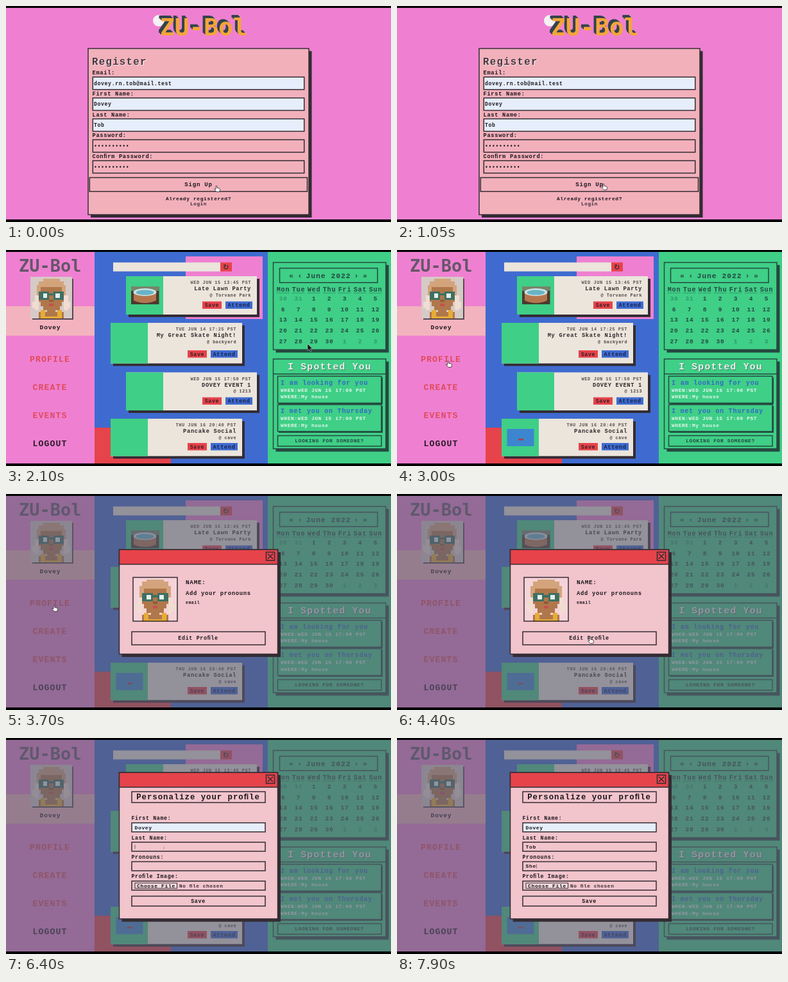
Recreate the animation shown at these times as an HTML page. Size 600 by 338 pixels, loop 8 s.

```html
<!DOCTYPE html>
<html lang="en">
<head>
<meta charset="utf-8">
<title>Register and edit profile</title>
<style>
  html, body { margin: 0; width: 100%; height: 100%; overflow: hidden; background: #000; }
  svg { display: block; width: 100%; height: 100%; }
  text { font-family: "Liberation Mono", monospace; font-weight: 700; letter-spacing: .08em; white-space: pre; }
  .logo { font-family: "DejaVu Sans Mono", monospace; letter-spacing: 0; }
</style>
</head>
<body>
<svg id="stage" viewBox="0 0 600 338"></svg>
<script>
const LOOP = 8000;
const INK = '#332c33', PINK = '#ef80d1', ROSE = '#f2b0bb', BLUSH = '#f2c4cc', RED = '#e6434b',
      BLUE = '#3f6bd0', GREEN = '#3fcf87', CREAM = '#ebe5dc', FILLED = '#e6eefb', PINE = '#24483f';

const rect = (x, y, x2, y2, fill, extra = '') =>
  `<rect x="${x}" y="${y}" width="${x2 - x}" height="${y2 - y}" fill="${fill}" ${extra}/>`;
const box = (x, y, x2, y2, fill = 'none', stroke = INK, width = 1.5) =>
  rect(x, y, x2, y2, fill, `stroke="${stroke}" stroke-width="${width}"`);
// Low, widely spaced letters: size sets the advance, the glyphs are a little smaller
const text = (x, y, size, value, fill = '#1c161c', anchor = 'start', extra = '') =>
  `<text x="${x}" y="${y}" font-size="${size * 0.88}" fill="${fill}" text-anchor="${anchor}" ${extra}>${value}</text>`;
const mid = (x, y, size, value, fill, extra) => text(x, y, size, value, fill, 'middle', extra);
const logo = (x, y, size, fill) =>
  `<text class="logo" x="${x}" y="${y}" font-size="${size}" fill="${fill}">ZU-Bol</text>`;
const group = (id, content) => `<g id="${id}">${content}</g>`;
const panel = (x, y, x2, y2, fill, shade = INK) =>
  rect(x + 4, y + 4, x2 + 4.5, y2 + 4.5, shade) + box(x, y, x2, y2, fill, shade);

function avatar(x, y, size, back) {
  const u = size / 20;
  const hair = '#d3a47c', skin = '#b0774b', pale = '#f1dcd2', frame = '#3f6f62', lens = '#e4efea', gold = '#e6ac35';
  const px = (a, b, w, h, c) => rect(x + a * u, y + b * u, x + (a + w) * u, y + (b + h) * u, c, 'shape-rendering="crispEdges"');
  const pair = (a, b, w, h, c) => px(a, b, w, h, c) + px(20 - a - w, b, w, h, c);
  return px(0, 0, 20, 20, back) +
    px(6, 1, 8, 1, hair) + px(4, 2, 12, 2, hair) + px(3, 4, 14, 6, hair) +
    pair(2, 9, 2, 7, pale) + pair(1, 12, 2, 3, pale) +
    px(5, 5, 10, 9, skin) + px(4, 7, 12, 5, skin) + px(6, 14, 8, 2, skin) + px(8, 15, 4, 3, skin) +
    px(4, 17, 12, 3, skin) + pair(4, 7, 5, 4, frame) + px(9, 8, 2, 1, frame) + pair(6, 8, 2, 2, lens) +
    px(9, 11, 2, 1, '#8e5c3a') + px(9, 13, 2, 1, '#c5504e') + pair(5, 16, 2, 4, gold) + px(7, 19, 6, 1, gold);
}

function registerPage() {
  const labels = ['Email:', 'First Name:', 'Last Name:', 'Password:', 'Con\uFB01rm Password:'];
  const values = ['dovey.rn.tob@mail.test', 'Dovey', 'Tob', '•'.repeat(10), '•'.repeat(10)];
  const fields = labels.map((label, i) => {
    const y = 111.2 + i * 32.7;
    return text(134.5, y - 4, 9.9, label) + box(135.3, y, 464.7, y + 19.5, i < 3 ? FILLED : ROSE) +
      text(137, y + 12.5, 9.25, values[i]);
  }).join('');
  return rect(0, 3, 600, 334, PINK) +
    '<circle cx="238" cy="23" r="9" fill="#f5f1f5"/>' +
    logo(236, 42, 37.8, '#33434c') + logo(238, 44, 37.8, '#33434c') + logo(240, 46, 37.8, '#f3a53a') +
    panel(128, 66.5, 472, 326.5, ROSE) +
    text(135.2, 93.2, 17.9, 'Register', '#fbe3e4') + text(134, 92, 17.9, 'Register', '#453a42') +
    fields + box(130.3, 268.5, 469.5, 290.3, ROSE) + mid(300, 282, 10.4, 'Sign Up') +
    mid(300, 303.5, 9, 'Already registered?') + mid(300, 312, 8.7, 'Login', '#3a2c34');
}

function eventCard(x, y, x2, y2, when, title, place) {
  const r = x2 - 9, b = y2 - 20.5;
  return rect(x + 4, y + 4, x2 + 4, y2 + 4, INK) + rect(x, y, x2, y2, CREAM) + rect(x, y, x + 58, y2, GREEN) +
    text(r, y + 12, 7.9, when, '#5a5350', 'end') + text(r, y + 22, 9.9, title, '#2c2629', 'end') +
    text(r, y + 31.5, 7.7, place, '#4c4644', 'end') +
    rect(r - 76, b, r - 46, b + 11.5, RED) + mid(r - 61, b + 8.5, 9.4, 'Save', '#3a1d24') +
    rect(r - 40, b, r + 2, b + 11.5, BLUE) + mid(r - 19, b + 8.5, 9.8, 'Attend', '#172348');
}

function calendar() {
  const days = ['Mon', 'Tue', 'Wed', 'Thu', 'Fri', 'Sat', 'Sun']
    .map((d, i) => mid(432 + i * 24, 65, 11.5, d, PINE) +
      `<path d="M${422 + i * 24} 67.3h20" stroke="${PINE}" stroke-width=".8" stroke-dasharray="1 1"/>`).join('');
  let dates = '';
  for (let i = 0; i < 35; i++) {
    const n = i - 1, inMonth = n > 0 && n <= 30;
    const label = n <= 0 ? 31 + n : n > 30 ? n - 30 : n;
    dates += mid(432 + i % 7 * 24, 79.2 + Math.floor(i / 7) * 16.6, 10.8, label, inMonth ? PINE : '#2c996c');
  }
  return panel(416.5, 19.5, 592, 156, GREEN, PINE) + box(426.5, 28.5, 579, 51, 'none', PINE) +
    mid(445, 44, 13, '«', PINE) + mid(458.5, 44, 13, '‹', PINE) + mid(502.5, 43.5, 13, 'June 2022', PINE) +
    mid(546.5, 44, 13, '›', PINE) + mid(560, 44, 13, '»', PINE) + days + dates;
}

function spotted() {
  const note = (y, title) => rect(425, y + 2, 587, y + 44, PINE) + box(423.5, y, 585, y + 42, GREEN, PINE) +
    text(428, y + 13.2, 11.4, title, '#3468c4') +
    text(428, y + 24, 8.9, 'WHEN:WED JUN 15 17:00 PST', '#e8f7ec') +
    text(428, y + 34.5, 8.9, 'WHERE:My house', '#e8f7ec');
  return panel(416.5, 170.5, 592, 311, GREEN, PINE) +
    `<path d="M416 194H592" stroke="${PINE}" stroke-width="1.5"/>` +
    mid(505.3, 187.8, 16.8, 'I Spotted You', '#2f7a5f') + mid(504.5, 187, 16.8, 'I Spotted You', '#f3ecee') +
    note(197.5, 'I am looking for you') + note(242, 'I met you on Thursday') +
    box(423.5, 290.5, 585, 307, 'none', PINE) + mid(504, 301.3, 9, 'LOOKING FOR SOMEONE?', PINE);
}

function dashboard() {
  const links = ['PROFILE', 'CREATE', 'EVENTS', 'LOGOUT']
    .map((s, i) => mid(68.5, 174.8 + i * 44.2, 15, s, i < 3 ? '#e04a5c' : '#2a1c28')).join('');
  const tub = rect(195, 57, 238.5, 85, '#4a3b30') + rect(195, 57, 238.5, 64, '#77856a') +
    '<path d="M199 66v13q18 8 35 0V66z" fill="#b5764d"/><ellipse cx="216.5" cy="66" rx="18" ry="6" fill="#cfe3e6"/>' +
    '<ellipse cx="216.5" cy="66.5" rx="14" ry="4" fill="#68b4c6"/>';
  const pond = rect(171.5, 280, 213.5, 307, '#3c86cf') + rect(189, 295, 197, 298, '#9c4657');
  return rect(0, 3, 138, 334, PINK) + rect(0, 88, 138, 134, '#f3b3be') +
    logo(20, 34, 27, '#66566a') +
    rect(41, 45, 105, 109, '#574852') + avatar(38, 42, 65, '#d6cac6') + mid(69, 124, 11, 'Dovey') + links +
    rect(138, 3, 408, 334, BLUE) + rect(280, 10, 400, 108, PINK) + rect(138, 278, 257, 334, RED) +
    rect(167, 19.5, 334, 33.5, CREAM) + rect(334, 19.5, 352, 33.5, RED) +
    `<path d="M344.5 24.1A3 3 0 1 1 340.6 24.6M339.3 23.2l2.9.4-.8 2.8" fill="none" stroke="${INK}" stroke-width="1.3"/>` +
    eventCard(187, 41, 391, 101, 'WED JUN 15 13:45 PST', 'Late Lawn Party', '@ Torvane Park') + tub +
    eventCard(163, 114, 368, 177.5, 'TUE JUN 14 17:25 PST', 'My Great Skate Night!', '@ backyard') +
    eventCard(187, 191.5, 391, 251, 'WED JUN 15 17:50 PST', 'DOVEY EVENT 1', '@ 1213') +
    eventCard(163, 264, 368, 322.5, 'THU JUN 16 20:40 PST', 'Pancake Social', '@ cave') + group('pond', pond) +
    rect(408, 3, 600, 334, GREEN) + calendar() + spotted();
}

const modal = (y, y2) => panel(176.5, y, 423.5, y2, BLUSH) + box(176.5, y, 423.5, y + 23, RED) +
  box(405.5, y + 4, 418.5, y + 17, 'none') +
  `<path d="M408 ${y + 6.5}l8 8m0-8l-8 8" stroke="${INK}" stroke-width="1.5"/>`;

const profileModal = () => modal(87, 250.5) + avatar(198, 130.5, 69, '#f6d3d8') + box(198, 130.5, 267, 199) +
  text(280, 140.5, 10.6, 'NAME:') + text(280, 157.5, 10, 'Add your pronouns') + text(280, 171.5, 7.4, 'email') +
  box(196, 215.5, 404, 236) + mid(299.5, 228.3, 9.5, 'Edit Pro\uFB01le');

const fieldY = i => 132.7 + i * 30.4;
function editModal() {
  const labels = ['First Name:', 'Last Name:', 'Pronouns:', 'Pro\uFB01le Image:'];
  const rows = labels.map((label, i) => {
    const y = fieldY(i);
    return text(195.5, y - 4.5, 9.4, label) +
      rect(196, y, 404, y + 14.2, BLUSH, `id="field${i}" stroke="${INK}" stroke-width="1.5"`) +
      (i < 3 ? text(200.5, y + 9.8, 9.1, '', '#1c161c', 'start', `id="value${i}"`) : '');
  }).join('');
  return modal(54, 283) + box(196, 84, 404, 101) + mid(299.5, 96, 14, 'Personalize your pro\uFB01le') + rows +
    box(201, 227, 266.5, 235.2, '#f4dce0', INK, 1) + text(204, 233.6, 9.1, 'Choose File') +
    text(270, 233.8, 8.8, 'No \uFB01le chosen', '#3a2c34') +
    box(196, 247.5, 404, 263) + mid(299.5, 258, 9.5, 'Save') +
    '<path id="caret" d="M0 0v6.5" stroke="#5a4a52" stroke-width=".8"/>';
}

const cursors =
  '<path id="hand" d="M0 .6q1-1.1 1.8.2v2.7l4 1q1.1.5.8 1.9L5.6 9.8H1.2L-2.1 6.2q-.2-1.3 1.3-.8L0 6z" fill="#fff" stroke="#2c242a" stroke-width=".8"/>' +
  '<path id="arrow" d="M0 0v10.5l2.5-2.2 1.7 3.8 1.8-.8L4.3 7.6h3.4z" fill="#111" stroke="#ddd" stroke-width=".5"/>' +
  '<path id="beam" d="M0-2v4" stroke="#6b5860" stroke-width=".7" opacity=".7"/>';

document.getElementById('stage').innerHTML =
  rect(0, 0, 600, 338, '#000') + group('register', registerPage()) + group('dashboard', dashboard()) +
  rect(0, 3, 600, 334, '#5c5c72', 'id="dim" fill-opacity=".61"') +
  group('profile', profileModal()) + group('edit', editModal()) + cursors;

const $ = id => document.getElementById(id);
const show = (id, on) => $(id).setAttribute('visibility', on ? 'visible' : 'hidden');

const T = { home: 1600, pond: 2500, profile: 3450, edit: 4750, focus: 5050, fill: 5900, last: 6250, pronouns: 7250 };
// Pointer stops: time, x, y
const path = [
  [0, 327, 281], [150, 327, 281], [900, 321, 278], [1650, 321, 278], [2100, 470, 147], [2300, 470, 147],
  [3050, 74, 174], [3800, 74, 174], [4400, 300, 224], [4800, 300, 224], [5150, 242, 133],
  [5950, 242, 133], [6200, 246, 172], [8000, 246, 172]
];
function pointer(t) {
  const i = path.findIndex(p => p[0] > t), [t0, x0, y0] = path[i - 1], [t1, x1, y1] = path[i];
  const k = (t - t0) / (t1 - t0), e = k * k * (3 - 2 * k);
  return [x0 + (x1 - x0) * e, y0 + (y1 - y0) * e];
}
const typed = (word, t, start, step) => word.slice(0, Math.max(0, Math.floor((t - start) / step) + 1));

function draw(t) {
  const editing = t >= T.edit;
  show('register', t < T.home);
  show('dashboard', t >= T.home);
  show('pond', t >= T.pond);
  show('dim', t >= T.profile);
  show('profile', t >= T.profile && !editing);
  show('edit', editing);

  const values = [t >= T.fill ? 'Dovey' : '', typed('Tob', t, 6700, 140), typed('She', t, 7500, 150)];
  values.forEach((v, i) => { $('value' + i).textContent = v; });
  $('field0').setAttribute('fill', values[0] ? FILLED : BLUSH);
  const active = t < T.last ? 0 : t < T.pronouns ? 1 : 2;
  $('caret').setAttribute('transform', `translate(${201 + values[active].length * 5.46} ${fieldY(active) + 4})`);
  show('caret', editing && t >= T.focus);

  const [x, y] = pointer(t);
  const beam = t >= 5000;
  const hand = t < T.home + 50 || (t >= 2950 && t < 3900) || (t >= 4250 && t < 4850);
  const shape = beam ? 'beam' : hand ? 'hand' : 'arrow';
  for (const id of ['hand', 'arrow', 'beam']) {
    $(id).setAttribute('transform', `translate(${x} ${y})`);
    show(id, id === shape && t < 6700);
  }
}

const start = performance.now();
function frame() {
  draw((performance.now() - start) % LOOP);
  requestAnimationFrame(frame);
}
frame();
</script>
</body>
</html>
```
